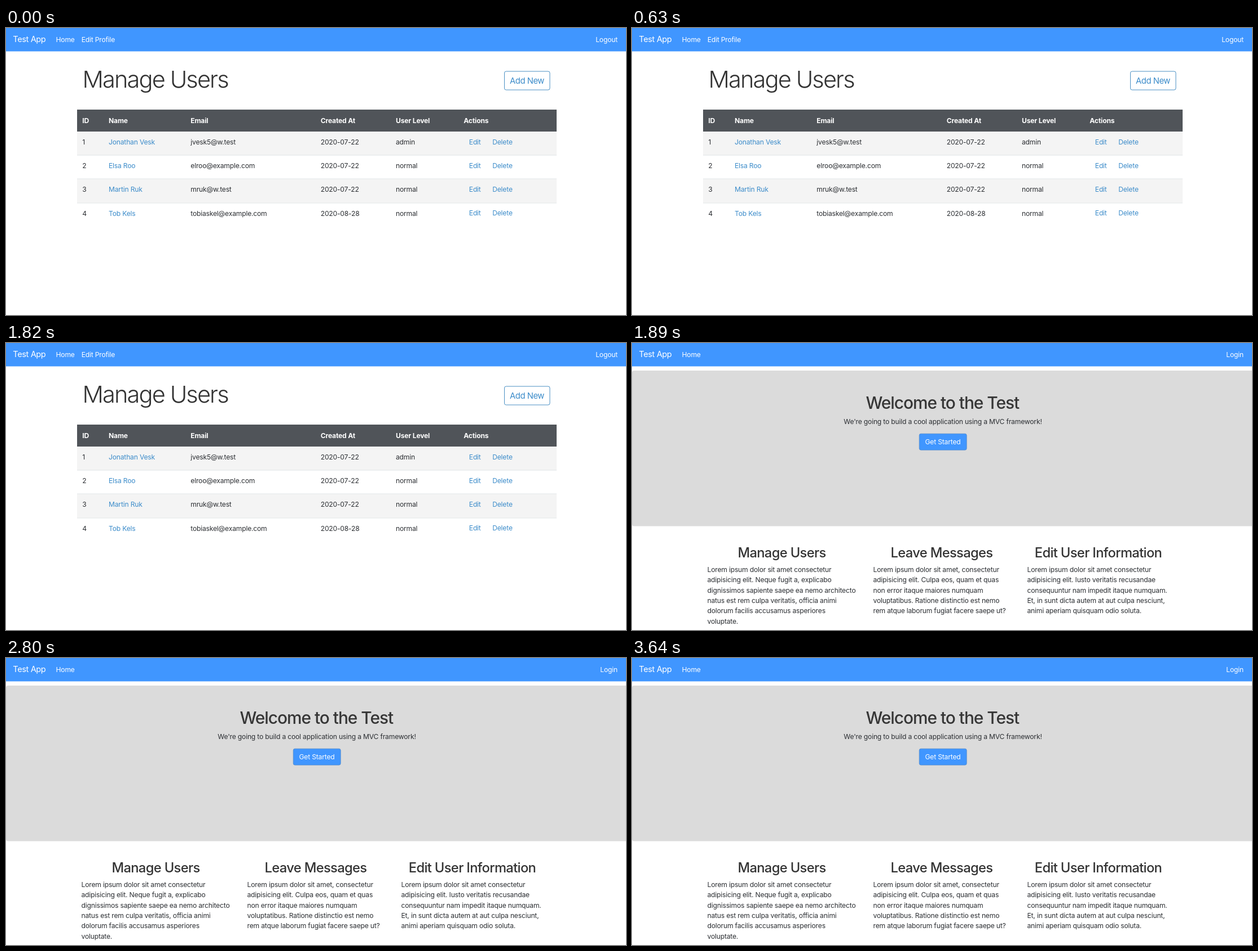
Animation of 1099x510 px, one loop 3710 ms. Source, as an HTML page:

```html
<!DOCTYPE html>
<html lang="en">
<head>
<meta charset="utf-8">
<title>User management demo</title>
<style>
  html, body { margin: 0; width: 100%; height: 100%; overflow: hidden; background: #fff; }
  svg { display: block; width: 100%; height: 100%; }
  text {
    font: 400 12.1px Inter, "Open Sans", sans-serif;
    font-optical-sizing: none;
    letter-spacing: -.18px;
    fill: #2c2f33;
    white-space: pre;
  }
  .nav { fill: #fff; }
  .brand { fill: #fff; font-size: 14.6px; letter-spacing: -.4px; }
  .title { font-size: 41.5px; font-weight: 300; letter-spacing: -1.85px; fill: #333; }
  .hero { font-size: 29.8px; font-weight: 500; letter-spacing: -1px; fill: #363636; }
  .sub { font-size: 23.7px; font-weight: 500; letter-spacing: -.64px; fill: #333; }
  .th { font-weight: 700; fill: #fff; }
  .link { fill: #3c8cca; }
  .add { fill: #3c8cca; font-size: 14.8px; letter-spacing: -.45px; }
</style>
</head>
<body>
<svg id="stage" viewBox="0 0 1099 510" preserveAspectRatio="none"></svg>
<script>
const LOOP = 3710, LOGOUT_AT = 1890;
const NS = 'http://www.w3.org/2000/svg';
const stage = document.getElementById('stage');

function add(parent, tag, attrs = {}, content = '') {
  const node = document.createElementNS(NS, tag);
  for (const key in attrs) node.setAttribute(key, attrs[key]);
  node.textContent = content;
  return parent.appendChild(node);
}
const rect = (g, x, y, width, height, fill, more) =>
  add(g, 'rect', { x, y, width, height, fill, ...more });
const label = (g, x, y, content, cls = '', anchor = 'start') =>
  add(g, 'text', { x, y, class: cls, 'text-anchor': anchor }, content);

function navbar(g, links, right) {
  rect(g, 0, 0, 1099, 41.5, '#4096ff');
  label(g, 12.3, 25, 'Test App', 'brand');
  links.forEach(([x, name]) => label(g, x, 24.5, name, 'nav'));
  label(g, 1084, 24.5, right, 'nav', 'end');
}

function usersPage() {
  const g = add(stage, 'g');
  navbar(g, [[88.5, 'Home'], [133.7, 'Edit Profile']], 'Logout');
  label(g, 135.5, 106, 'Manage Users', 'title');
  rect(g, 883.5, 77, 80.5, 33, '#fff', { rx: 3, stroke: '#4a90c4' });
  label(g, 923.5, 98.8, 'Add New', 'add', 'middle');

  const columns = [135.3, 182, 327.3, 557.7, 691, 811.3];
  rect(g, 126, 145, 850, 39, '#505459');
  ['ID', 'Name', 'Email', 'Created At', 'User Level', 'Actions']
    .forEach((name, i) => label(g, columns[i], 168.5, name, 'th'));

  const users = [
    ['Jonathan Vesk', 'jvesk5@w.test', '2020-07-22', 'admin'],
    ['Elsa Roo', 'elroo@example.com', '2020-07-22', 'normal'],
    ['Martin Ruk', 'mruk@w.test', '2020-07-22', 'normal'],
    ['Tob Kels', 'tobiaskel@example.com', '2020-08-28', 'normal']
  ];
  users.forEach((user, i) => {
    const top = 184 + 42.2 * i, base = top + 23;
    if (i % 2 === 0) rect(g, 126, top, 850, 42.2, '#f4f4f4');
    if (i) rect(g, 126, Math.round(top) - .5, 850, 1, '#e2e5e8');
    [i + 1, ...user].forEach((cell, c) =>
      label(g, columns[c], base, cell, c === 1 ? 'link' : ''));
    label(g, 820.8, base - .3, 'Edit', 'link');
    label(g, 862.2, base - .3, 'Delete', 'link');
  });
  return g;
}

function homePage() {
  const g = add(stage, 'g');
  navbar(g, [[88.5, 'Home']], 'Login');
  rect(g, 0, 49, 1110, 276.5, '#dbdbdb', { rx: 4 });
  label(g, 550.3, 117, 'Welcome to the Test', 'hero', 'middle');
  label(g, 551, 144, "We're going to build a cool application using a MVC framework!", '', 'middle');
  rect(g, 509.2, 161.2, 84, 29, '#4096ff', { rx: 3, stroke: '#5086c4', 'stroke-width': .7 });
  label(g, 551, 180, 'Get Started', 'nav', 'middle');

  const cards = [
    [134, 265.5, 'Manage Users', [
      'Lorem ipsum dolor sit amet consectetur',
      'adipisicing elit. Neque fugit a, explicabo',
      'dignissimos sapiente saepe ea nemo architecto',
      'natus est rem culpa veritatis, officia animi',
      'dolorum facilis accusamus asperiores',
      'voluptate.']],
    [428, 549, 'Leave Messages', [
      'Lorem ipsum dolor sit amet, consectetur',
      'adipisicing elit. Culpa eos, quam et quas',
      'non error itaque maiores numquam',
      'voluptatibus. Ratione distinctio est nemo',
      'rem atque laborum fugiat facere saepe ut?']],
    [701, 826.5, 'Edit User Information', [
      'Lorem ipsum dolor sit amet consectetur',
      'adipisicing elit. Iusto veritatis recusandae',
      'consequuntur nam impedit itaque numquam.',
      'Et, in sunt dicta autem at aut culpa nesciunt,',
      'animi aperiam quisquam odio soluta.']]
  ];
  cards.forEach(([left, center, heading, lines]) => {
    label(g, center, 381.3, heading, 'sub', 'middle');
    lines.forEach((line, i) => label(g, left - .5, 406.8 + 18.38 * i, line));
  });
  return g;
}

const users = usersPage(), home = homePage();
const start = performance.now();

function draw(now) {
  const loggedIn = Math.max(0, now - start) % LOOP < LOGOUT_AT;
  users.style.display = loggedIn ? '' : 'none';
  home.style.display = loggedIn ? 'none' : '';
  requestAnimationFrame(draw);
}
draw(start);
</script>
</body>
</html>
```
